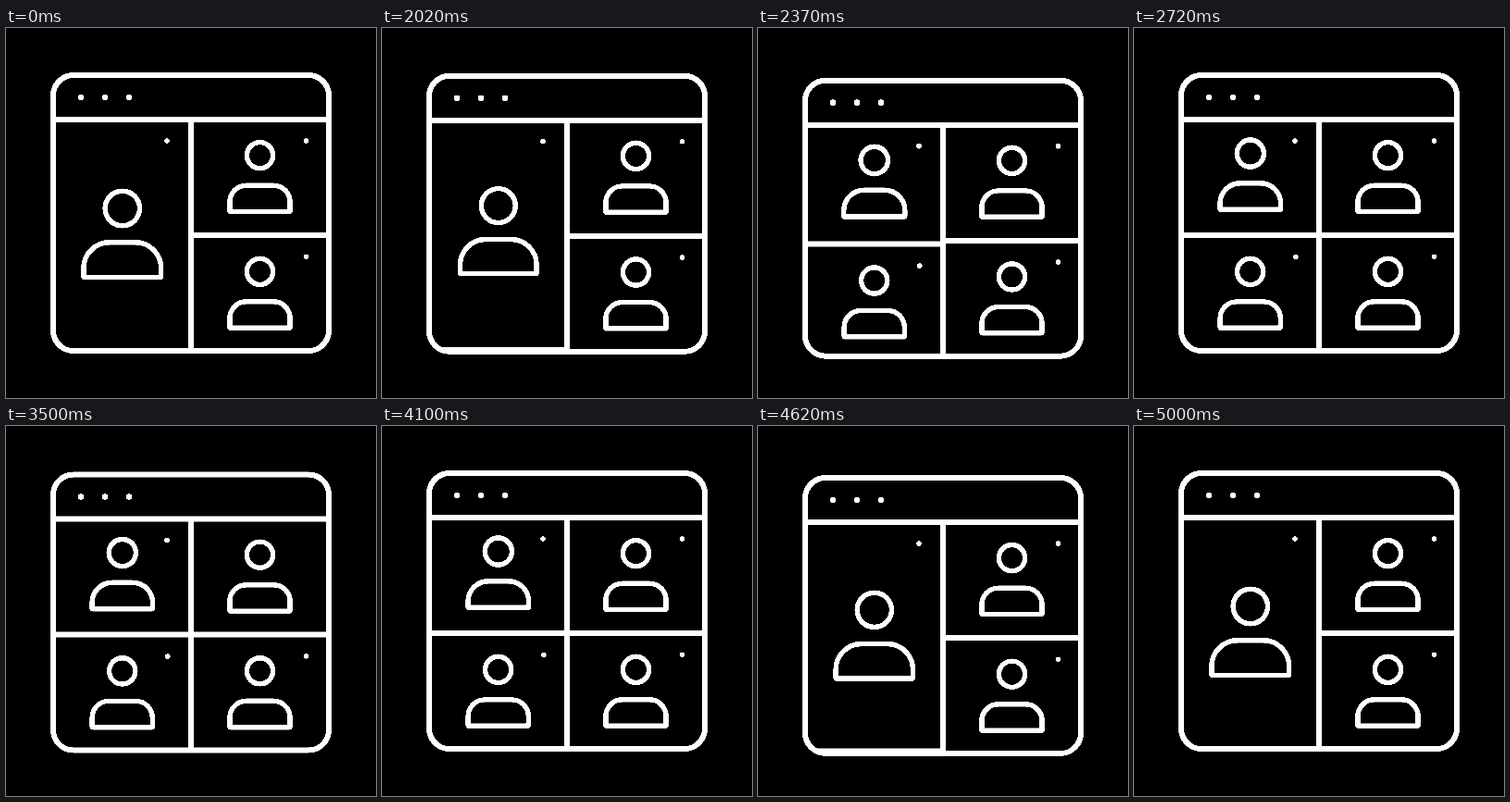
Animation, 400 px wide and 400 px high, one loop 5020 ms. Source, as an HTML page with a canvas:

```html
<!DOCTYPE html>
<html>
<head>
<meta charset="utf-8">
<style>
  html, body { margin: 0; width: 100%; height: 100%; overflow: hidden; background: #000; }
  canvas { display: block; filter: contrast(5); } /* crisp, nearly unsmoothed edges */
</style>
</head>
<body>
<canvas id="stage" width="400" height="400"></canvas>
<script>
const ctx = document.getElementById('stage').getContext('2d');
const LOOP = 5020, SPLIT = 2010, MERGE = 4240, MOVE = 520;

const clamp = v => Math.min(1, Math.max(0, v));
const mix = (a, b, k) => a + (b - a) * k;
const within = (t, ...spans) => spans.some(([a, b]) => t >= a && t < b);

const easeOut = u => 1 - (1 - u) ** 3;
const easeSlide = u => 1 - (1 - u ** 1.5) ** 4;

// 0 = one tall left cell, 1 = two left cells
function splitAmount(t, ease) {
  return ease(clamp((t - SPLIT) / MOVE)) - ease(clamp((t - MERGE) / MOVE));
}

// Quick drop, slow return
function bump(t, start, rise, length, height) {
  const s = t - start;
  if (s <= 0 || s >= length) return 0;
  return height * (s < rise ? s / rise : (1 - (s - rise) / (length - rise)) ** 2.5);
}

function line(x1, y1, x2, y2) {
  ctx.beginPath();
  ctx.moveTo(x1, y1);
  ctx.lineTo(x2, y2);
  ctx.stroke();
}

function dot(x, y, r = 2.8) {
  ctx.beginPath();
  ctx.arc(x, y, r, 0, Math.PI * 2);
  ctx.fill();
}

function person(x, headY, headR, halfWidth, top, bottom, corner) {
  ctx.lineWidth = 5.4;
  ctx.beginPath();
  ctx.arc(x, headY, headR, 0, Math.PI * 2);
  ctx.stroke();
  ctx.beginPath();
  ctx.roundRect(x - halfWidth, top, halfWidth * 2, bottom - top, [corner, corner, 1, 1]);
  ctx.stroke();
}

const smallPerson = (x, y) => person(x, y, 14.1, 32.6, y + 32.5, y + 60.9, 18);

function windowFrame() {
  ctx.beginPath();
  ctx.roundRect(51, 51, 298, 298, 22);
}

function draw(t) {
  const offset = bump(t, SPLIT, 205, 740, 13.4)
               + bump(t, 3335, 45, 450, 3.6)
               + bump(t, MERGE, 205, 740, 13.4);
  const grown = 1 - splitAmount(t, easeOut);
  const slide = 125 * (1 - splitAmount(t, easeSlide));

  ctx.fillStyle = '#000';
  ctx.fillRect(0, 0, 400, 400);
  ctx.save();
  ctx.translate(0, offset);
  ctx.strokeStyle = ctx.fillStyle = '#fff';
  ctx.lineWidth = 6;
  ctx.lineJoin = 'round';

  windowFrame();
  ctx.stroke();
  line(51, 99, 349, 99);
  line(200, 99, 200, 349);
  line(200, 224, 349, 224);
  for (const x of [81, 107, 133]) dot(x, 75, 3.3);

  ctx.save();
  windowFrame();
  ctx.clip();
  ctx.translate(0, slide);
  line(51, 224, 200, 224);
  smallPerson(125.7, 263.4);
  if (!within(t, [2530, 2680], [2950, 3100])) dot(174.8, 247.5);
  ctx.restore();

  person(125.8, mix(135.6, 195, grown), mix(14.6, 18.7, grown), mix(32.8, 41.9, grown),
    mix(167.7, 231.8, grown), mix(196.2, 269.5, grown), mix(22, 28, grown));
  if (!within(t, [4390, 4550], [4810, 4980])) dot(174, 122);

  smallPerson(274.5, 137.7);
  if (!within(t, [3490, 3650], [3920, 4100])) dot(324.5, 122);
  smallPerson(274.5, 263.3);
  dot(324.5, 247.3);

  ctx.restore();
}

function tick() {
  draw(performance.now() % LOOP);
  requestAnimationFrame(tick);
}
tick();
</script>
</body>
</html>
```
